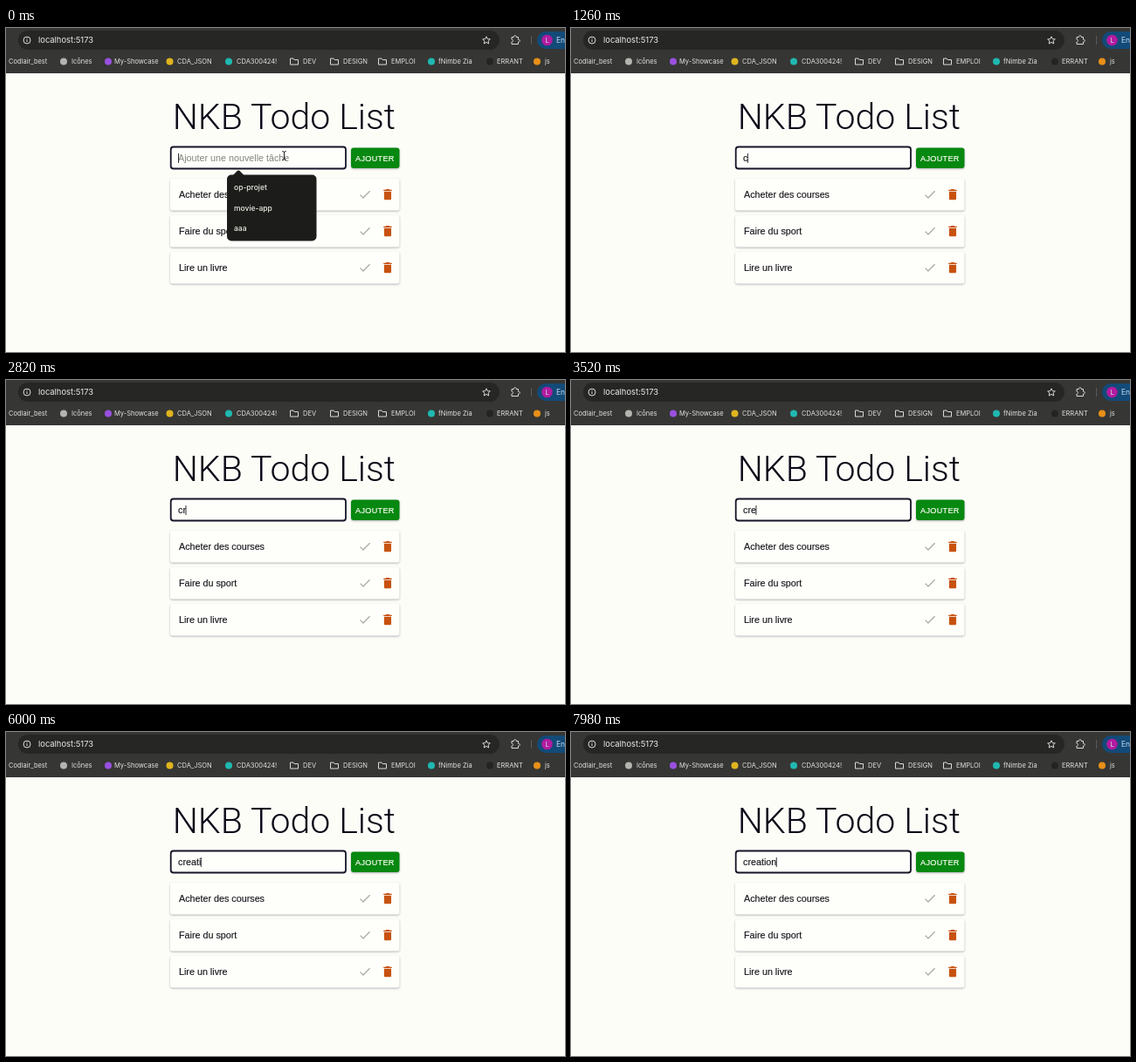
An HTML page that plays this animation: 640 by 372 pixels, repeating every 8000 ms.

```html
<!DOCTYPE html>
<html lang="fr">
<head>
<meta charset="utf-8">
<title>Todo List</title>
<style>
  html, body { margin: 0; width: 100%; height: 100%; overflow: hidden; background: #fdfdf8; }
  svg { display: block; width: 640px; height: 372px; }
  text { font-family: "Liberation Sans", Arial, sans-serif; font-size: 10.75px; fill: #16161c; white-space: pre; }
  .ui { font-family: Inter, sans-serif; font-size: 7.5px; fill: #e2e2de; }
  .url { font-size: 9.4px; fill: #ecece8; }
  .title { font-family: Roboto, sans-serif; font-weight: 300; font-size: 41px; fill: #0a0a18; }
  .body { stroke: #16161c; stroke-width: .15px; }
  .button { font-size: 9.1px; letter-spacing: .32px; fill: #fdfdf8; stroke: #fdfdf8; stroke-width: .2px; }
  .popup text { font-family: Inter, sans-serif; font-weight: 500; font-size: 8.5px; fill: #ececE4; }
  .line { fill: none; stroke: #dadad6; stroke-width: 1; }
  .card { fill: #fefefa; filter: drop-shadow(0 1px 1px #66667a80); }
</style>
</head>
<body>
<svg viewBox="0 0 640 372">
  <defs>
    <path id="check" d="M9 16.17 4.83 12l-1.42 1.41L9 19 21 7l-1.41-1.41z"/>
    <path id="trash" d="M6 19c0 1.1.9 2 2 2h8c1.1 0 2-.9 2-2V7H6v12zM19 4h-3.5l-1-1h-5l-1 1H5v2h14V4z"/>
    <path id="folder" class="line" d="M-4.5 3.5v-7h3.5l1.2 1.5h4.3v5.5z" stroke-linejoin="round"/>
  </defs>
  <rect width="640" height="372" fill="#fdfdf8"/>

  <rect width="640" height="52" fill="#363634"/>
  <rect x="14" y="3" width="551" height="22" rx="11" fill="#262624"/>
  <g class="line">
    <circle cx="24" cy="14" r="4"/>
    <path d="M24 13.3v2.8M24 11.4v1"/>
    <path d="M550 9.8l1.3 2.8 3 .3-2.2 2.1.6 3-2.7-1.6-2.7 1.6.6-3-2.2-2.1 3-.3z"/>
    <path d="M579 10.5h2.3c-.5-2.5 3.4-2.5 2.9 0h2.3v2.7c2.4-.4 2.4 3.2 0 2.8v2.5h-7.5v-2.5c2-.2 2-2.6 0-2.8z"/>
    <path d="M601.5 9v10" stroke="#5c5c5c"/>
  </g>
  <text class="ui url" x="37" y="17.2">localhost:5173</text>
  <rect x="608" y="4" width="60" height="20" rx="10" fill="#124a78"/>
  <circle cx="619.5" cy="14" r="6.3" fill="#b01ca0"/>
  <text class="ui" x="619.5" y="16.7" text-anchor="middle">L</text>
  <text class="ui" x="630" y="17" style="font-size:8.5px;fill:#c4dcf0">En pause</text>
  <g id="bookmarks"></g>

  <text class="title" x="446" y="115.5" text-anchor="end">NKB Todo List</text>
  <rect x="188.7" y="136.5" width="200.3" height="25" rx="3" fill="#fefefa" stroke="#141426" stroke-width="1.8"/>
  <text id="field" x="197" y="153"></text>
  <rect id="caret" y="144" width="1" height="11" fill="#30303a"/>
  <rect x="395" y="137.5" width="55.5" height="23.5" rx="3" fill="#078810" style="filter:drop-shadow(0 1px 1px #66667a80)"/>
  <text class="button" x="400" y="152.5">AJOUTER</text>
  <g id="tasks"></g>

  <g id="popup" class="popup">
    <path d="M259.5 169.5l5.3-5.4q1.4-1.4 2.8 0l5.3 5.4z" fill="#1c1c1a"/>
    <rect x="253" y="168.5" width="102.5" height="76" rx="5" fill="#1c1c1a"/>
    <text x="261" y="186">op-projet</text>
    <text x="261" y="209.7">movie-app</text>
    <text x="261" y="233.3">aaa</text>
  </g>
  <path id="pointer" d="M316.3 141.5q2.2 0 2.2 1.5 0-1.5 2.2-1.5M318.5 143v7M316.3 151.5q2.2 0 2.2-1.5 0 1.5 2.2 1.5" fill="none" stroke="#222226"/>
</svg>
<script>
  const LOOP = 8000;
  const WORD = 'creation';
  const KEY_TIMES = [1200, 2590, 3050, 4010, 5000, 5500, 6660, 7320];
  const POINTER_HIDDEN = 300;
  const BLINK = 900;
  const byId = id => document.getElementById(id);

  // label, text x, icon x, icon colour or 'folder'
  const bookmarks = [
    ['Codlair_best', 3],
    ['Icônes', 75, 66, '#b4b4b0'],
    ['My-Showcase', 124, 117, '#9a50e0'],
    ['CDA_JSON', 196, 187.5, '#e0b420'],
    ['CDA300424!', 264, 255, '#20b8b0'],
    ['DEV', 340, 330, 'folder'],
    ['DESIGN', 386, 376, 'folder'],
    ['EMPLOI', 441, 431, 'folder'],
    ['fNimbe Zia', 495, 487, '#20b8b0'],
    ['ERRANT', 562, 554, '#242424'],
    ['js', 617, 608, '#e89018'],
  ];
  const bookmarkIcon = (x, kind) =>
    !kind ? '' :
    kind === 'folder' ? `<use href="#folder" x="${x}" y="38.5"/>` :
    `<circle cx="${x}" cy="38.5" r="4" fill="${kind}"/>`;
  byId('bookmarks').innerHTML = bookmarks.map(([label, x, iconX, kind]) =>
    `${bookmarkIcon(iconX, kind)}<text class="ui" x="${x}" y="41">${label}</text>`).join('');

  const tasks = ['Acheter des courses', 'Faire du sport', 'Lire un livre'];
  byId('tasks').innerHTML = tasks.map((task, i) => `
    <g transform="translate(188 ${173 + 42 * i})">
      <rect class="card" width="262.5" height="36.5" rx="2.5"/>
      <text class="body" x="10" y="22">${task}</text>
      <use href="#check" transform="translate(214.8 10) scale(.68)" fill="#aeaea6"/>
      <use href="#trash" transform="translate(240.8 10) scale(.68)" fill="#c75210"/>
    </g>`).join('');

  const field = byId('field'), caret = byId('caret');
  const show = (el, visible) => el.setAttribute('visibility', visible ? 'visible' : 'hidden');

  function draw(time) {
    const typed = KEY_TIMES.filter(key => key <= time).length;
    const lastKey = typed ? KEY_TIMES[typed - 1] : 0;
    field.textContent = typed ? WORD.slice(0, typed) : 'Ajouter une nouvelle tâche';
    field.style.fill = typed ? '#16161c' : '#85857f';
    field.classList.toggle('body', typed > 0);
    caret.setAttribute('x', 197 + (typed ? field.getComputedTextLength() - .5 : 0));
    show(caret, (time - lastKey) % (2 * BLINK) < BLINK);
    show(byId('popup'), !typed);
    show(byId('pointer'), time < POINTER_HIDDEN);
  }

  const start = performance.now();
  function tick() {
    draw((performance.now() - start) % LOOP);
    requestAnimationFrame(tick);
  }
  tick();
</script>
</body>
</html>
```
